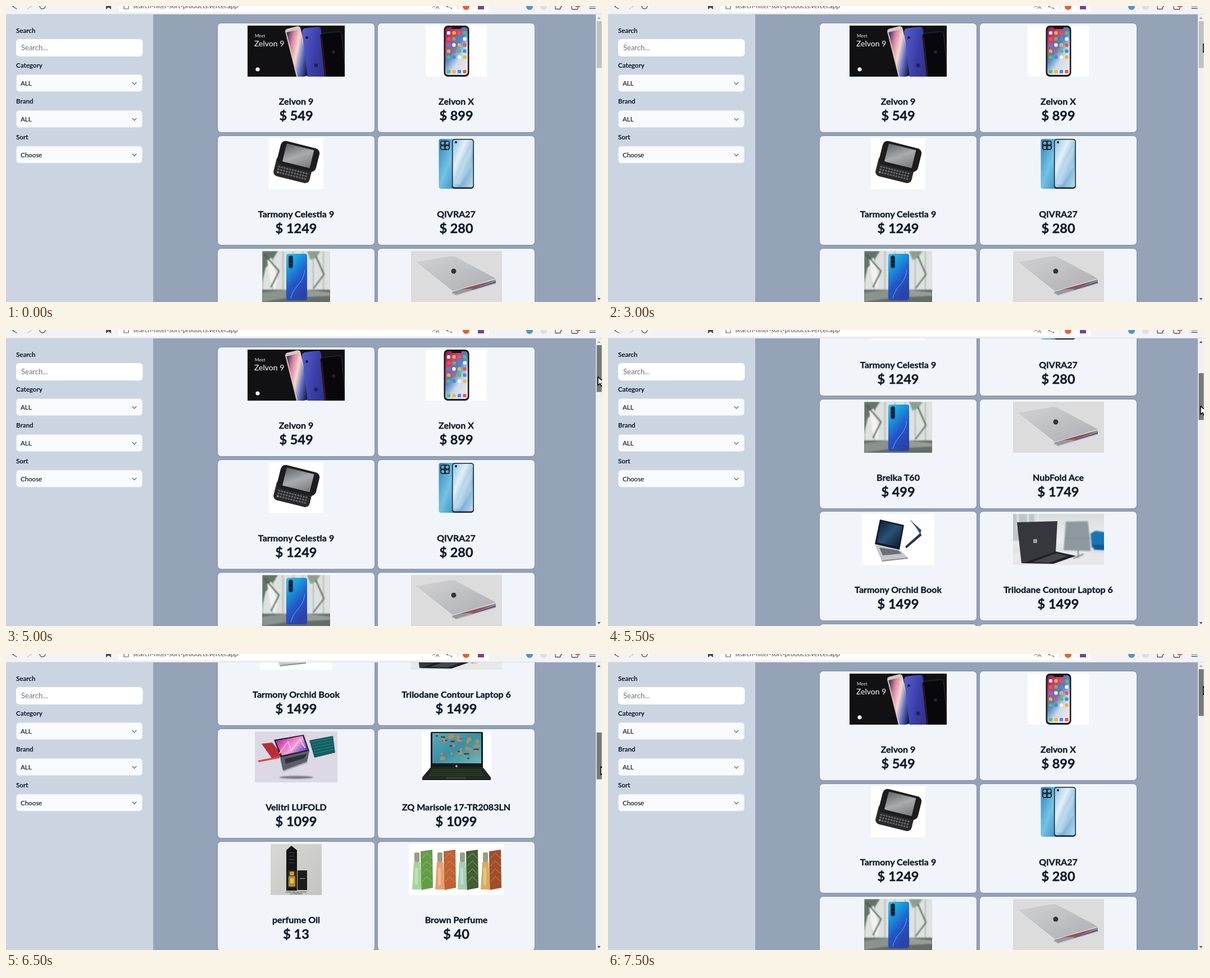
These frames come from a looping animation (1061x528 px, 8 s). An HTML page:

```html
<!DOCTYPE html>
<html lang="en">
<head>
<meta charset="utf-8">
<title>Product list</title>
<style>
  html, body { margin: 0; width: 100%; height: 100%; overflow: hidden; background: #94a3b8; }
  svg { display: block; font-family: Lato, "Open Sans", sans-serif; }
  .title, .price { font-weight: 700; text-anchor: middle; fill: #0f172a; stroke: #0f172a; stroke-width: .35px; }
  .title { font-size: 16px; }
  .price { font-size: 23.5px; }
  .label { font-weight: 600; font-size: 11.6px; fill: #0f172a; stroke: #0f172a; stroke-width: .2px; }
  .value { font-size: 11.5px; fill: #111827; stroke: #111827; stroke-width: .15px; }
  .hint { font-size: 13px; fill: #6b7280; }
  .url { font-size: 11.5px; fill: #4a4a52; }
  .card { filter: drop-shadow(0 .8px 1.2px rgba(15, 23, 42, .28)); }
  .soft { filter: blur(1.2px); }
</style>
</head>
<body>
<svg id="stage" width="1061" height="528" viewBox="0 0 1061 528" xmlns="http://www.w3.org/2000/svg"></svg>
<script>
const rect = (x, y, w, h, fill, r = 0, extra = '') =>
  `<rect x="${x}" y="${y}" width="${w}" height="${h}" rx="${r}" fill="${fill}" ${extra}/>`;
const poly = (points, fill, extra = '') => `<polygon points="${points}" fill="${fill}" ${extra}/>`;
const dot = (x, y, r, fill) => `<circle cx="${x}" cy="${y}" r="${r}" fill="${fill}"/>`;
const line = (d, stroke, width = 1) =>
  `<path d="${d}" fill="none" stroke="${stroke}" stroke-width="${width}" stroke-linecap="round" stroke-linejoin="round"/>`;
const text = (x, y, cls, body, extra = '') => `<text x="${x}" y="${y}" class="${cls}" ${extra}>${body}</text>`;
const repeat = (n, make) => Array.from({ length: n }, (_, i) => make(i)).join('');
const turn = (angle, x, y, body) => `<g transform="rotate(${angle} ${x} ${y})">${body}</g>`;
const soft = body => `<g class="soft">${body}</g>`;
const fade = (id, x2, y2, ...colors) =>
  `<linearGradient id="${id}" x2="${x2}" y2="${y2}">` +
  colors.map((c, i) => `<stop offset="${i / (colors.length - 1)}" stop-color="${c}"/>`).join('') +
  '</linearGradient>';

const gradients = '<defs>' +
  fade('bloom', .6, 1, '#20264f', '#d77fa0', '#f6d9d0', '#5b6cc4', '#171c48') +
  fade('indigo', 1, 1, '#5960d0', '#3a3da5', '#2a2c80') +
  fade('sunset', .7, 1, '#7a1c4e', '#d23c66', '#4f83c6', '#cfdbe8', '#e9e4ea') +
  fade('screen', 1, 1, '#5f6265', '#a9abad', '#77797b') +
  fade('sky', 1, 1, '#2f86bd', '#74c2e4', '#2f82b6') +
  fade('ice', 1, 1, '#8cc2e2', '#e2f0f7', '#78b0d6', '#bcdcec') +
  fade('aurora', .5, 1, '#2fc4e6', '#1797dc', '#2455c9', '#2b43a8') +
  fade('silver', 1, 1, '#d2d2d4', '#bfc0c2', '#adaeb1') +
  fade('night', 1, 1, '#0d1b33', '#2a5277', '#0b1528') +
  fade('room', 0, 1, '#d9dcdd', '#eceeee', '#cfd3d4') +
  fade('neon', 1, .6, '#54329c', '#e750b4', '#f4a5da', '#6a49c4') +
  fade('stone', 1, 1, '#d8d8d6', '#c4c4c2') +
  fade('sea', 1, 1, '#5aa9b4', '#3b8fa5', '#75b6ba') +
  '</defs>';

// Artwork is drawn from the top left corner of each 91px tall picture.
const trio = rect(0, 0, 173, 91, '#111114') +
  text(13, 21, '', 'Meet', 'font-size="8" fill="#eee"') +
  text(12, 37, '', 'Zelvon 9', 'font-size="14" fill="#fff"') +
  dot(18, 78, 3.6, '#fff') +
  turn(-14, 90, 45, rect(76, 2, 28, 100, '#d8c6c0', 5) + rect(78, 8, 24, 84, 'url(#bloom)', 1)) +
  turn(-7, 119, 50, rect(102, 3, 34, 105, 'url(#indigo)', 6) + dot(109, 20, 2.4, '#171838')) +
  dot(122, 71, 3.6, '#20225a') +
  turn(-6, 152, 50, rect(133, 12, 38, 95, '#08080c', 5, 'stroke="#30303a"') + line('M135 18V92', '#7b1726', 1)) +
  dot(153, 47, 3, '#25252c');

const iconColors = ['#f5f5f7', '#58c06a', '#f3b33c', '#3f8ee0', '#e8574e'];
const faceOn = rect(0, 0, 109, 91, '#fff') + rect(32.5, 0, 45, 91, '#17171c', 7) +
  rect(35, 3, 40, 85, 'url(#sunset)', 5) + rect(46, 2, 18, 4, '#17171c', 2) +
  repeat(20, i => rect(38 + i % 4 * 9.5, 10 + (i >> 2) * 10.8, 6, 6, iconColors[(i * 7 + (i >> 2)) % 5], 1.5)) +
  repeat(4, i => rect(38 + i * 9.5, 79, 6, 6, iconColors[(i + 1) % 5], 1.5));

const slider = rect(0, 0, 97, 91, '#fff') + turn(14, 47, 48,
  rect(12, 38, 66, 37, '#29292b', 8) +
  repeat(33, i => rect(18 + i % 11 * 5, 56 + Math.floor(i / 11) * 5, 3.6, 3, i === 22 ? '#d99a3c' : '#66686b', 1)) +
  rect(13, 10, 71, 43, '#1d1d1f', 9) + rect(23, 14, 50, 33, 'url(#screen)', 1));

const bluePair = rect(0, 0, 63, 91, '#f5f8fa') + rect(.5, 1, 34, 89, 'url(#sky)', 4) +
  rect(3, 4, 17, 17, '#1a3145', 4) +
  repeat(4, i => dot(7.5 + i % 2 * 8, 8.5 + (i >> 1) * 8, 2.7, '#7d9eb3')) +
  rect(24, 1, 39, 89, '#14202b', 5) + rect(25.5, 2.5, 36, 85, 'url(#ice)', 4) +
  soft(poly('28,82 45,40 59,14 59,50 39,83', '#fff', 'opacity=".3"')) + dot(31, 7, 2, '#14202b');

const garden = rect(0, 0, 121, 91, '#dde1df') + soft(
  repeat(7, i => rect(i * 18, 0, 2, 70, '#b4bcb8')) +
  poly('0,0 28,0 17,18 6,30 0,58', '#62756a') + poly('80,0 104,0 96,12 86,16', '#8da08f') +
  poly('9,16 17,12 27,52 22,72 14,50', '#f2f3f0') + line('M4 6L30 36L16 64M96 10L110 42L92 66', '#48584c', 2) +
  rect(-4, 69, 130, 26, '#646d68') + poly('0,74 43,69 43,84 0,91', '#8b938e') + poly('80,69 121,74 121,80 80,82', '#969d97')) +
  rect(43, 5, 37, 83, 'url(#aurora)', 4) + line('M51 84C58 58 72 62 76 34', '#4fb8ea', 1) +
  rect(47, 8, 8, 23, '#17345b', 4) + repeat(3, i => dot(51, 12 + i * 7, 2.5, '#0b1528'));

const silverLaptop = rect(0, 0, 162, 91, '#dcdcdc') +
  poly('74,70 151,50 151,58 80,79 73,76', '#96989c') + poly('84,69 150,52 112,67', '#9a4f52') +
  poly('106,69 151,54 151,57 111,70', '#525d85') +
  poly('8,20 72,9 78,10 151,49 74,72', 'url(#silver)') + line('M8 20L74 72L151 50', '#ececec', 1) +
  line('M74 75L80 79L151 58', '#c4c5c7', 1.5) + dot(76, 36, 4.5, '#343438');

const twoLaptops = rect(0, 0, 129, 91, '#fff') +
  poly('32,10 75,20 67,64 23,54', '#111a29') + poly('34,13 72,22 65,59 27,51', 'url(#night)') +
  poly('23,55 67,64 82,78 35,83', '#c5c7ca') + poly('31,60 64,65 71,71 37,74', '#6b6e74') +
  poly('35,83 82,78 82,80 36,85', '#85888d') +
  poly('85,10 89,13 104,36 105,30', '#172640') + poly('86,11 106,29 104,34', '#365077') +
  poly('104,34 106,38 79,61 77,58', '#25385a') + line('M79 61L106 38', '#0e1829', 1);

const office = rect(0, 0, 162, 91, 'url(#room)') + soft(
  rect(-4, 0, 42, 48, '#bec6c9') + repeat(3, i => rect(7 + i * 18, 0, 3, 28, '#e7eaec')) +
  poly('94,14 133,13 137,44 138,66 90,65', '#8d999f') + line('M92 44H137', '#77848b', 1) +
  poly('138,35 147,30 166,33 166,63 140,60', '#1b75b3') + poly('142,54 166,56 166,65 144,64', '#0e5991') +
  poly('-4,69 92,65 166,71 166,95 -4,95', '#e7e8e7') + line('M116 66V78M108 79L125 72', '#73818a', 2)) +
  poly('7,15 79,13 76,68 15,88', '#35373c') + poly('15,88 76,67 112,75 72,89', '#202126') +
  poly('34,86 78,70 98,75 65,87', '#44464c') + rect(36, 45, 7, 7, '#9a9ca0');

const colorLaptops = rect(0, 0, 147, 91, '#dcd8e4') +
  soft('<ellipse cx="74" cy="82" rx="30" ry="2.5" fill="#77727f"/>') +
  poly('12,22 31,20 48,42 31,49', '#b72f35') + poly('5,52 31,47 48,43 43,48 7,55', '#d7474a') +
  poly('97,16 139,8 143,38 106,47', '#155e61') +
  repeat(5, i => line(`M${102 + i} ${19 + i * 5}L${137 + i} ${12 + i * 5}`, '#258b84', 1)) +
  poly('34,15 87,6 97,35 46,47', '#242238') + poly('37,17 85,8 94,33 48,43', 'url(#neon)') +
  line('M44 39L59 18L65 35L80 14L89 29', '#f9bde8', 2) +
  poly('45,47 97,35 93,54 50,70', '#5b5f68') + poly('53,49 92,40 88,48 55,58', '#2e3139') +
  poly('50,70 93,54 94,56 51,72', '#a5a8b0');

const gaming = rect(0, 0, 124, 91, '#fff') + rect(16, 1, 93, 65, '#17191b', 2) +
  rect(19, 3, 87, 54, 'url(#sea)') +
  repeat(30, i => {
    const x = 27 + (i * 29) % 73, y = 8 + (i * i * 7 + i * 11) % 44;
    return `<ellipse cx="${x}" cy="${y}" rx="${2 + i % 4}" ry="${1.5 + i % 3}" fill="${i % 3 ? '#b98b59' : '#563d2d'}"/>`;
  }) +
  dot(62, 62, 2, '#a9b4a8') + poly('16,64 109,64 123,82 123,87 1,87 1,82', '#242726') +
  poly('18,68 107,68 114,79 9,79', '#111713') +
  repeat(4, i => line(`M${18 - i * 2} ${69 + i * 3}H${106 + i * 2}`, '#4b8b4a', .8)) +
  poly('44,81 78,81 80,85 42,85', '#353a37');

const giftBox = rect(0, 0, 91, 91, 'url(#stone)') +
  poly('28,11 37,3 47,11 47,83 28,83', '#141414') + rect(30, 47, 16, 31, '#352713') +
  rect(34, 49, 8, 7, '#c39b43', 1) + rect(32, 57, 12, 19, '#b58a2e', 2) + rect(35, 61, 6, 9, '#e2c06b', 1) +
  rect(48, 47, 17, 35, '#1c1c1c') + rect(52, 61, 9, 1, '#aaa') +
  repeat(4, i => rect(33, 15 + i * 6, 9, .8, '#555')) +
  text(46, 87, '', 'EXPERT PERFUME GIFT BOX', 'font-size="2.8" text-anchor="middle" fill="#333"') +
  text(46, 90, '', 'OIL FRAGRANCE', 'font-size="2.8" text-anchor="middle" fill="#333"');

const scents = [[6, '#a4d59c', '#639d46'], [47, '#e9a06c', '#bf6234'], [87, '#a4cfb0', '#425e32'], [128, '#d9ac58', '#a24c2c']];
const perfumes = rect(0, 0, 169, 91, '#fff') + scents.map(([x, glass, box]) =>
  poly(`${x + 15},13 ${x + 36},10 ${x + 37},78 ${x + 16},82`, box) +
  repeat(4, i => line(`M${x + 18} ${25 + i * 14}L${x + 26} ${16 + i * 14}L${x + 35} ${25 + i * 14}`, glass, .7)) +
  rect(x + 4, 15, 9, 17, '#9a9c85', 2) +
  poly(`${x + 3},32 ${x + 14},32 ${x + 17},81 ${x},81`, glass) + rect(x + 5, 42, 5, 31, '#fff', 2, 'opacity=".3"')).join('');

const products = [
  ['Zelvon 9', 549, 173, trio],
  ['Zelvon X', 899, 109, faceOn],
  ['Tarmony Celestia 9', 1249, 97, slider],
  ['QIVRA27', 280, 63, bluePair],
  ['Brelka T60', 499, 121, garden],
  ['NubFold Ace', 1749, 162, silverLaptop],
  ['Tarmony Orchid Book', 1499, 129, twoLaptops],
  ['Trilodane Contour Laptop 6', 1499, 162, office],
  ['Velitri LUFOLD', 1099, 147, colorLaptops],
  ['ZQ Marisole 17-TR2083LN', 1099, 124, gaming],
  ['perfume Oil', 13, 91, giftBox],
  ['Brown Perfume', 40, 169, perfumes]
];

const card = ([name, price, width, art], i) => {
  const x = i % 2 ? 662 : 377, y = Math.round(31 + 200.75 * (i >> 1));
  return `<g transform="translate(${x} ${y})">` + rect(0, 0, 279, 194, '#f1f5f9', 6, 'class="card"') +
    `<svg x="${Math.round(139.5 - width / 2)}" y="4" width="${width}" height="91">${art}</svg>` +
    text(139.5, 145, 'title', name) + text(139.5, 173, 'price', `$ ${price}`) + '</g>';
};

const select = (y, label, value) => text(18, y - 12, 'label', label) +
  rect(18.5, y + .5, 224, 30, '#f9fafb', 5, 'stroke="#e3e8ee"') +
  text(26, y + 20, 'value', value) + line(`M225 ${y + 14.5}l3.5 3.5l3.5 -3.5`, '#6b7280', 1.4);

const sidebar = rect(0, 15, 262, 513, '#cbd5e1') + text(18, 48, 'label', 'Search') +
  rect(18, 59, 225.5, 31, '#fff', 6) + text(27, 79, 'hint', 'Search...') +
  select(122, 'Category', 'ALL') + select(186, 'Brand', 'ALL') + select(249.6, 'Sort', 'Choose');

const toolbar = rect(0, 0, 1061, 15, '#f3f3f5') + rect(200, -10, 659, 21, '#fff', 4) +
  rect(0, 14, 1061, 1, '#dcdde1') +
  line('M19 -4L12 1L19 5', '#55555d', 1.4) + line('M38 -4L45 1L38 5', '#c9c9ce', 1.4) +
  line('M70 0A5 5 0 1 1 65 -5', '#55555d', 1.4) + poly('178,-4 187,-4 187,6 182.5,2.5 178,6', '#45454d') +
  line('M210 -2V5H218V-2', '#5d5d65', 1.2) + text(226, 4, 'url', 'search-filter-sort-products.vercel.app') +
  line('M759 3L765 -3M761 -1L764 2M765 5L768 -1L771 5M766 3H770', '#777780', 1) +
  line('M785 1L793 -3M785 1L793 4', '#8d8d95', 1) + dot(785, 1, 1.5, '#8d8d95') + dot(793, 4, 1.5, '#8d8d95') +
  rect(804, 0, 1, 7, '#d0d0d5') + dot(819, 1, 6, '#f05a2b') + rect(840, -5, 11, 11, '#7b3f98') +
  dot(932, 1, 6, '#4f94cf') + dot(957, 1, 6, '#dedee2') +
  line('M978 -2V5.5H987V2C990 2 990 -2 987 -2V-5', '#55555d', 1.3) +
  rect(1007, -5, 11, 11, 'none', 2, 'stroke="#55555d" stroke-width="1.3"') + rect(1013, -5, 10, 7, '#e35a3c', 3) +
  line('M1039 0H1049M1039 4H1049', '#55555d', 1.3);

const scrollbar = rect(1050, 15, 11, 513, '#f1f1f1') + poly('1052.5,23 1055.5,19.5 1058.5,23', '#505050', 'id="up"') +
  poly('1052.5,521 1058.5,521 1055.5,524.5', '#505050') + rect(1051.5, 27, 9, 83.5, '#c1c1c1', 0, 'id="thumb"');

const pointer = '<path id="pointer" d="M.8 .8V15.5L4.6 12.4L7.2 17.4L9.8 16L7.4 11.2L12.8 10.6Z" ' +
  'fill="#fff" stroke="#000" stroke-width="1.5" stroke-linejoin="round"/>';

const stage = document.getElementById('stage');
stage.innerHTML = gradients + rect(0, 0, 1061, 528, '#94a3b8') +
  `<g id="list">${products.map(card).join('')}</g>` + sidebar + scrollbar + toolbar + pointer;
const [list, thumb, up, cursor] = ['list', 'thumb', 'up', 'pointer'].map(id => document.getElementById(id));

// start ms, pointer x, pointer y, scroll offset, dragging
const steps = [
  [0, -50, -50, 0, false],
  [1500, 302, 92, 0, false],
  [2000, 711, 57, 0, false],
  [2500, 1059, 110, 0, false],
  [3000, 1059, 67, 0, false],
  [3500, 1059, 73, 0, false],
  [4000, 1059, 152, 0, false],
  [4500, 1059, 86, 0, false],
  [5000, 1053, 83, 0, true],
  [5500, 1054, 135, 309, true],
  [6000, 1058, 202, 675, true],
  [6500, 1058, 200, 700, true],
  [7000, 1059, 149, 506, true],
  [7500, 1059, 57, 0, true]
];
const LOOP = 8000, PAGE_PER_THUMB = 6.186;
let shown;

function draw() {
  const time = performance.now() % LOOP;
  const step = steps.findLast(s => s[0] <= time);
  if (step !== shown) {
    shown = step;
    const [, x, y, scroll, dragging] = step;
    list.setAttribute('transform', `translate(0 ${-scroll})`);
    thumb.setAttribute('y', 27 + Math.round(scroll / PAGE_PER_THUMB));
    thumb.setAttribute('fill', dragging ? '#787878' : '#c1c1c1');
    up.setAttribute('fill', scroll ? '#505050' : '#a3a3a3');
    cursor.setAttribute('transform', `translate(${x} ${y})`);
  }
  requestAnimationFrame(draw);
}
draw();
</script>
</body>
</html>
```
